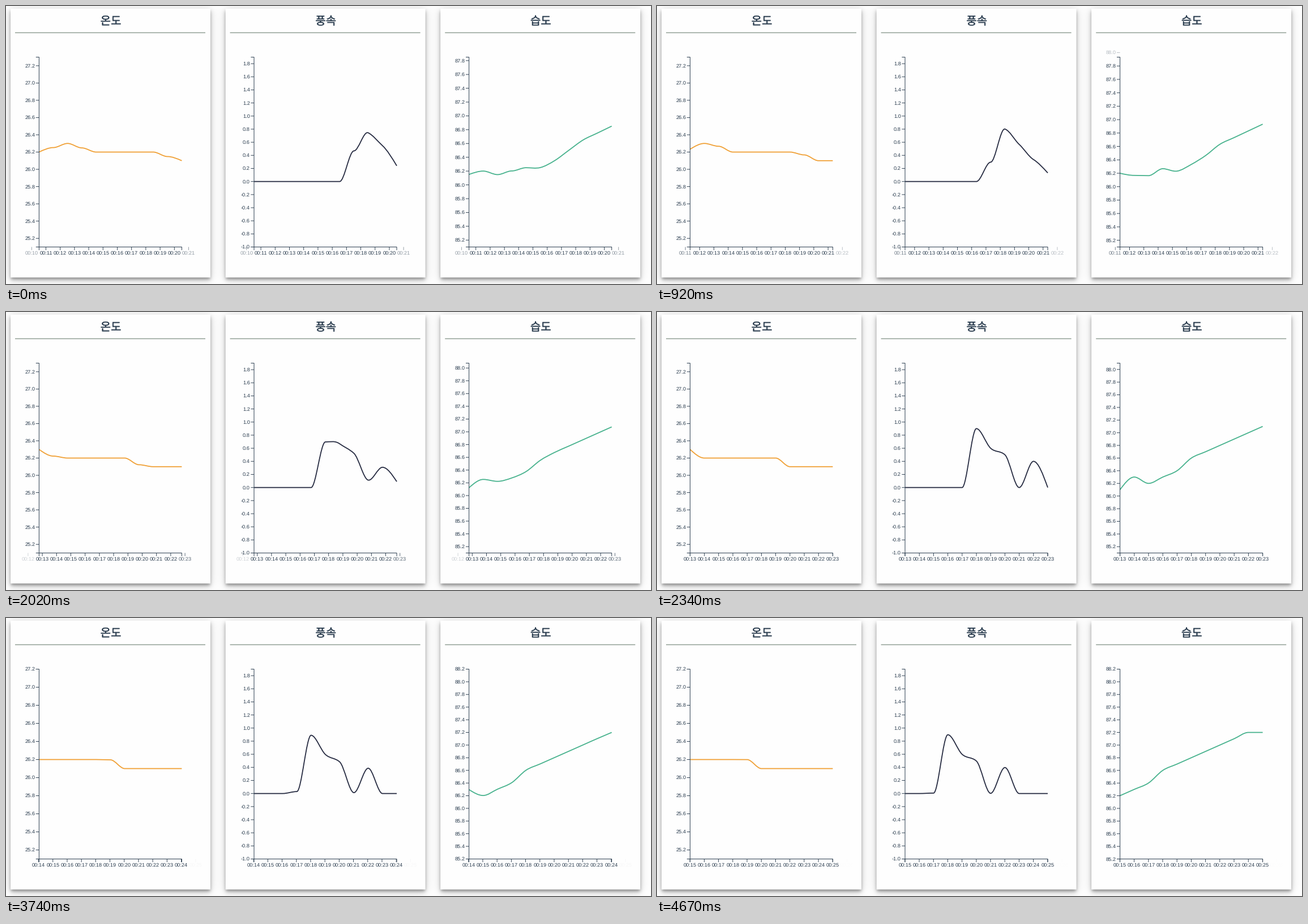
Recreate the animation shown at these times as a matplotlib script. Size 1139 by 492 pixels, loop 4.72 s.

```python
import math

import numpy as np
import matplotlib.pyplot as plt
from matplotlib.animation import FuncAnimation
from matplotlib.collections import LineCollection
from matplotlib.colors import to_rgba
from matplotlib.patches import PathPatch
from matplotlib.patheffects import withStroke
from matplotlib.path import Path

plt.rcParams["text.hinting"] = "none"

W, H, DPI = 1139, 492, 64
PX = 72 / DPI                      # one pixel in points
LOOP, STEP = 4720, 20
STARTS = [-380, 594, 1558, 2573, 3588, 4568]
DURATION = 750
FIRST, SPAN = 10, 10               # first minute shown, minutes per window

LEFT, TOP, BOTTOM = 58.4, 90.5, 426.5
PITCH, TICK = 25.2, 5.6
INK = "#2c3e50"
TITLE_FONT, LABEL_FONT = "Noto Sans CJK JP", "Liberation Sans"

# title, line colour, readings per minute from 00:10
CHARTS = [
    ("온도", "#f0a035", [26.2, 26.2, 26.3, 26.3] + [26.2] * 6 + [26.1] * 7),
    ("풍속", "#272c42", [0] * 8 + [.9, .6, .5, 0, .4, 0, 0, 0, 0]),
    ("습도", "#47b28d",
     [86.1, 86.2, 86.2, 86.1, 86.3, 86.2, 86.3, 86.4, 86.6, 86.7,
      86.8, 86.9, 87.0, 87.1, 87.2, 87.2, 87.2]),
]
CARD_LEFT, CARD_W, CARD_PITCH = 8, 353, 379.6
CARD_TOP, CARD_BOTTOM = 4.5, 480.5


def ease(t):
    t = min(max(t, 0), 1)
    return 4 * t ** 3 if t < .5 else 1 - 4 * (1 - t) ** 3


def soft_step(n, a, b, sigma):
    """Coverage of the span a..b over n pixels, blurred by sigma."""
    k = sigma * math.sqrt(2)
    return np.array([(math.erf((i + .5 - a) / k) - math.erf((i + .5 - b) / k)) / 2
                     for i in range(n)])


def backdrop():
    img = np.full((H, W), 254.0)
    lefts = [CARD_LEFT + i * CARD_PITCH for i in range(len(CHARTS))]
    # vertical offset, blur, spread, opacity
    shadows = [(3, 5, -1, .32), (5, 8, 0, .20), (2, 18, 0, .13)]
    for x in lefts:
        for dy, blur, grow, alpha in shadows:
            cols = soft_step(W, x - grow, x + CARD_W + grow, blur / 2)
            rows = soft_step(H, CARD_TOP + dy - grow, CARD_BOTTOM + dy + grow, blur / 2)
            img *= 1 - alpha * np.outer(rows, cols)
    for x in lefts:
        cover = np.outer(soft_step(H, CARD_TOP, CARD_BOTTOM, .25),
                         soft_step(W, x, x + CARD_W, .25))
        img = img * (1 - cover) + 254 * cover
    return np.repeat(img.round().astype(np.uint8)[:, :, None], 3, axis=2)


def tangents(y):
    """Monotone cubic slopes for evenly spaced points."""
    s = np.diff(y) / PITCH
    a, b = s[:-1], s[1:]
    inner = (np.sign(a) + np.sign(b)) * np.minimum(
        np.minimum(abs(a), abs(b)), abs(a + b) / 4)
    return np.concatenate([[(3 * s[0] - inner[0]) / 2], inner,
                           [(3 * s[-1] - inner[-1]) / 2]])


def curve(x, y, slope):
    d = PITCH / 3
    pts = [(x[0], y[0])]
    for i in range(len(x) - 1):
        pts += [(x[i] + d, y[i] + d * slope[i]),
                (x[i + 1] - d, y[i + 1] - d * slope[i + 1]),
                (x[i + 1], y[i + 1])]
    return Path(pts, [Path.MOVETO] + [Path.CURVE4] * (len(pts) - 1))


class Window:
    """Scales, ticks and pixel curve of one ten-minute view."""

    def __init__(self, data, index, x0):
        view = np.array(data[index:index + SPAN + 1], float)
        self.minute, self.x0 = FIRST + index, x0
        self.low, self.high = view.min() - 1, view.max() + 1
        self.y = self.y_pos(view)
        self.slope = tangents(self.y)
        self.x_ticks = set(range(self.minute, self.minute + SPAN + 1))
        # value ticks are counted in fifths
        self.y_ticks = set(range(math.ceil(self.low * 5 - 1e-6),
                                 math.floor(self.high * 5 + 1e-6) + 1))

    def x_pos(self, minute):
        return self.x0 + (minute - self.minute) * PITCH

    def y_pos(self, value):
        return BOTTOM - (value - self.low) / (self.high - self.low) * (BOTTOM - TOP)


def moving_ticks(old, new, old_pos, new_pos, p):
    """Yield key, position and opacity while one tick set turns into another."""
    for key in sorted(old | new):
        alpha = 1 if key in old and key in new else (p if key in new else 1 - p)
        if alpha > .004:
            yield key, old_pos(key) + (new_pos(key) - old_pos(key)) * p, alpha


class Chart:
    def __init__(self, ax, index, title, color, data):
        shift = index * CARD_PITCH
        card_x = CARD_LEFT + shift
        self.x0 = x0 = LEFT + shift
        self.xs = x0 + PITCH * np.arange(SPAN + 1)
        self.windows = [Window(data, i, x0) for i in range(len(data) - SPAN)]

        def rule(xs, ys, color, width):
            ax.plot(xs, ys, color=color, lw=width * PX, snap=False,
                    solid_capstyle="butt", solid_joinstyle="miter")

        def label(text, align):
            return ax.text(0, 0, text, fontsize=9.3 * PX, color=INK,
                           family=LABEL_FONT, ha=align, va="baseline", visible=False)

        ax.text(card_x + CARD_W / 2 + .6, 33, title, fontsize=20 * PX, color=INK,
                family=TITLE_FONT, ha="center", va="baseline",
                path_effects=[withStroke(linewidth=.3 * PX, foreground=INK)])
        rule([card_x + 8, card_x + CARD_W - 9], [47.3, 47.3], "#98a59b", 1.6)
        right = x0 + SPAN * PITCH
        rule([x0 - TICK, x0, x0, x0 - TICK], [TOP, TOP, BOTTOM, BOTTOM], INK, 1)
        rule([x0, x0, right, right],
             [BOTTOM + TICK, BOTTOM, BOTTOM, BOTTOM + TICK], INK, 1)

        self.marks = LineCollection([], linewidths=.95 * PX, snap=False)
        ax.add_collection(self.marks, autolim=False)
        self.line = PathPatch(Path([(0, 0)]), fc="none", ec=color, lw=1.8 * PX,
                              capstyle="butt", snap=False)
        ax.add_patch(self.line)

        minutes = set().union(*(w.x_ticks for w in self.windows))
        fifths = set().union(*(w.y_ticks for w in self.windows))
        self.x_labels = {m: label(f"00:{m:02d}", "center") for m in minutes}
        self.y_labels = {v: label(f"{v / 5:.1f}", "right") for v in fifths}

    def show(self, step, p):
        a, b = self.windows[step], self.windows[step + 1]
        self.line.set_path(curve(self.xs, a.y + (b.y - a.y) * p,
                                 a.slope + (b.slope - a.slope) * p))
        for text in (*self.x_labels.values(), *self.y_labels.values()):
            text.set_visible(False)
        segments, colors = [], []

        def place(text, x, y, alpha, segment):
            text.set(position=(x, y), alpha=alpha, visible=True)
            segments.append(segment)
            colors.append(to_rgba(INK, alpha))

        for m, x, alpha in moving_ticks(a.x_ticks, b.x_ticks, a.x_pos, b.x_pos, p):
            place(self.x_labels[m], x, 440, alpha,
                  [(x, BOTTOM), (x, BOTTOM + TICK)])
        for v, y, alpha in moving_ticks(a.y_ticks, b.y_ticks,
                                        lambda k: a.y_pos(k / 5),
                                        lambda k: b.y_pos(k / 5), p):
            place(self.y_labels[v], self.x0 - 7, y + 2.9, alpha,
                  [(self.x0 - TICK, y), (self.x0, y)])
        self.marks.set_segments(segments)
        self.marks.set_color(colors)


fig = plt.figure(figsize=(W / DPI, H / DPI), dpi=DPI, facecolor="#fefefe")
fig.figimage(backdrop(), origin="upper", zorder=-1)
ax = fig.add_axes([0, 0, 1, 1])
ax.set(xlim=(0, W), ylim=(H, 0), autoscale_on=False)
ax.axis("off")
charts = [Chart(ax, i, *spec) for i, spec in enumerate(CHARTS)]


def draw(frame):
    t = frame * STEP
    step = sum(t >= start for start in STARTS) - 1
    p = ease((t - STARTS[step]) / DURATION)
    for chart in charts:
        chart.show(step, p)
    return []


anim = FuncAnimation(fig, draw, frames=LOOP // STEP, interval=STEP,
                     init_func=lambda: [], repeat=True, repeat_delay=0,
                     blit=False, cache_frame_data=False)
plt.show()
```
